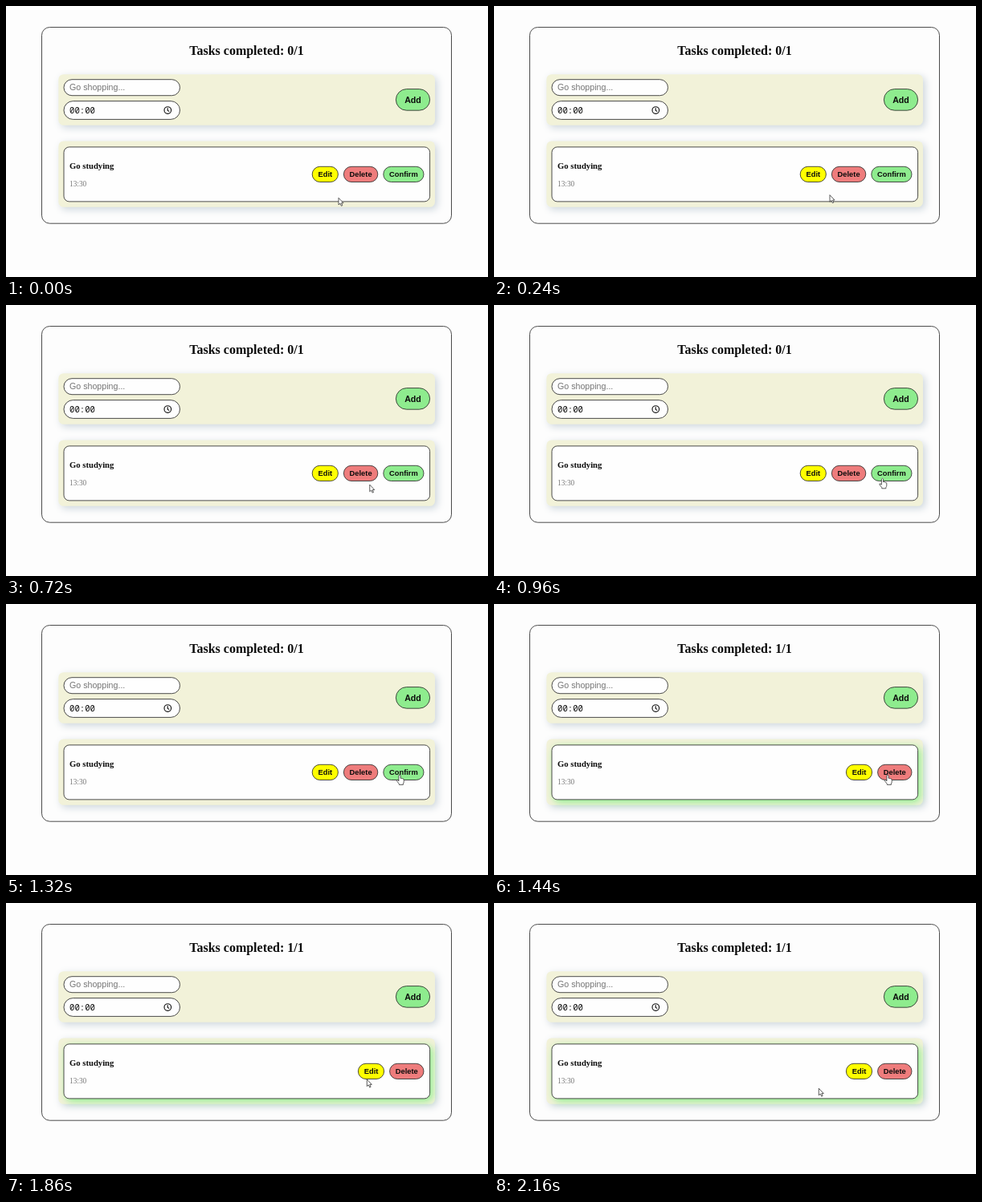
An HTML page for the animation above (2.22 s loop, 600 px wide and 338 px high).

```html
<!DOCTYPE html>
<html lang="en">
<head>
<meta charset="utf-8">
<title>Task list</title>
<style>
  html, body { margin: 0; width: 100%; height: 100%; overflow: hidden; background: #fdfdfd; }
  svg { display: block; width: 600px; height: 338px; }
  text { font-family: "Liberation Sans", Arial, sans-serif; fill: #0c0c0c; }
  .serif { font-family: "Liberation Serif", "Times New Roman", serif; }
  .mono { font-family: "Noto Sans Mono", monospace; font-size: 10.67px; font-weight: 500; }
  .bold { font-weight: bold; }
  .mid { text-anchor: middle; }
  .line { stroke: #2c2c2c; stroke-width: .85; fill: #fefefe; }
  .panel { fill: #f2f2d9; filter: drop-shadow(3.3px 3.3px 5px #cdd6dc); }
  .done .card { filter: drop-shadow(3.3px 3.3px 5px #90ee90); }
  .done #confirm { display: none; }
  .done #actions { transform: translateX(57.2px); }
  .btn text { font-size: 9.33px; font-weight: bold; text-anchor: middle; }
  .pointer { fill: #fff; stroke: #333; stroke-width: .8; stroke-linejoin: round; }
</style>
</head>
<body>
<svg id="app" viewBox="0 0 600 338">
  <rect class="line" x="44.5" y="26.5" width="510" height="244.7" rx="10" style="fill:#fdfdfd"/>
  <text id="count" class="serif bold mid" x="299.5" y="61" font-size="16">Tasks completed: 0/1</text>

  <rect class="panel" x="65.3" y="85.2" width="468.7" height="63.6" rx="6.5"/>
  <rect class="line" x="72" y="91.7" width="144.5" height="20" rx="10"/>
  <text x="79" y="105.2" font-size="10.67" style="fill:#757575">Go shopping...</text>
  <rect class="line" x="72" y="118.6" width="144.5" height="22.8" rx="11.4"/>
  <text class="mono" x="79" y="134">00:00</text>
  <g fill="none" stroke="#111" stroke-width="1.15">
    <circle cx="201.3" cy="130" r="4.3"/>
    <path d="M201.2 127.3V130.2L203.2 131.6"/>
  </g>
  <g class="btn">
    <rect class="line" x="485.4" y="103.6" width="42.2" height="26.6" rx="13.3" style="fill:#8eec8e"/>
    <text x="506.5" y="120.5" style="font-size:10.67px">Add</text>
  </g>

  <rect class="panel" x="65.3" y="168.4" width="468.7" height="82.4" rx="6.5"/>
  <rect class="line card" x="72" y="175.9" width="455.6" height="68" rx="6.7"/>
  <text class="serif bold" x="79" y="203" font-size="10.67">Go studying</text>
  <text class="serif" x="79" y="225" font-size="9.33" style="fill:#777">13:30</text>
  <g id="actions">
    <g class="btn">
      <rect class="line" x="381.2" y="200.3" width="32.2" height="19.2" rx="9.6" style="fill:#ff0"/>
      <text x="397.4" y="212.7">Edit</text>
    </g>
    <g class="btn">
      <rect class="line" x="420.4" y="200.3" width="42.4" height="19.2" rx="9.6" style="fill:#ee7c7c"/>
      <text x="441.6" y="212.7">Delete</text>
    </g>
    <g class="btn" id="confirm">
      <rect class="line" x="469.8" y="200.3" width="50.2" height="19.2" rx="9.6" style="fill:#8eec8e"/>
      <text x="494.9" y="212.7">Confirm</text>
    </g>
  </g>

  <g id="cursor" class="pointer">
    <path id="arrow" d="M0 0V8.6L2 6.9L3.4 10L4.8 9.4L3.5 6.4H6Z"/>
    <path id="hand" d="M-1.1 1Q0 -.8 1.1 1V4.6Q2 3.9 2.6 4.9Q3.6 4.3 4.1 5.4Q5.3 5 5.3 6.6V9Q5.1 10.4 4.4 11.2V12.6H-.7V11.5L-3.6 7.8Q-3.7 6.4 -2.4 6.7L-1.1 8Z"/>
  </g>
</svg>
<script>
const LOOP = 2220, STEP = 60, CONFIRMED = 1440;
// time, x, y of the pointer tip
const path = [
  [0, 414, 239.3], [480, 422, 232], [960, 483.5, 216.2], [1320, 490, 212.8],
  [1620, 490, 212.8], [1860, 449.3, 220], [2160, 404.3, 231.2]
];
// left and right edges of the buttons in each state
const pending = [[381, 413.5], [420.5, 463], [470, 520]];
const finished = [[438.5, 471], [477.5, 520]];
const $ = id => document.getElementById(id);
const app = $("app"), count = $("count"), cursor = $("cursor"), arrow = $("arrow"), hand = $("hand");

function pointerAt(t) {
  let i = 0;
  while (i < path.length - 2 && t >= path[i + 1][0]) i++;
  const [t0, x0, y0] = path[i], [t1, x1, y1] = path[i + 1];
  const p = Math.min(1, (t - t0) / (t1 - t0));
  const e = p * p * (3 - 2 * p);
  return [x0 + (x1 - x0) * e, y0 + (y1 - y0) * e];
}

function draw(t) {
  const done = t >= CONFIRMED;
  const [x, y] = pointerAt(t);
  const over = y > 200 && y < 219.8 &&
    (done ? finished : pending).some(([a, b]) => x > a && x < b);
  app.classList.toggle("done", done);
  count.textContent = `Tasks completed: ${done ? 1 : 0}/1`;
  cursor.setAttribute("transform", `translate(${x} ${y})`);
  arrow.style.display = over ? "none" : "";
  hand.style.display = over ? "" : "none";
}

const start = performance.now();
function tick() {
  const t = (performance.now() - start) % LOOP;
  draw(Math.floor(t / STEP) * STEP);
  requestAnimationFrame(tick);
}
tick();
</script>
</body>
</html>
```
